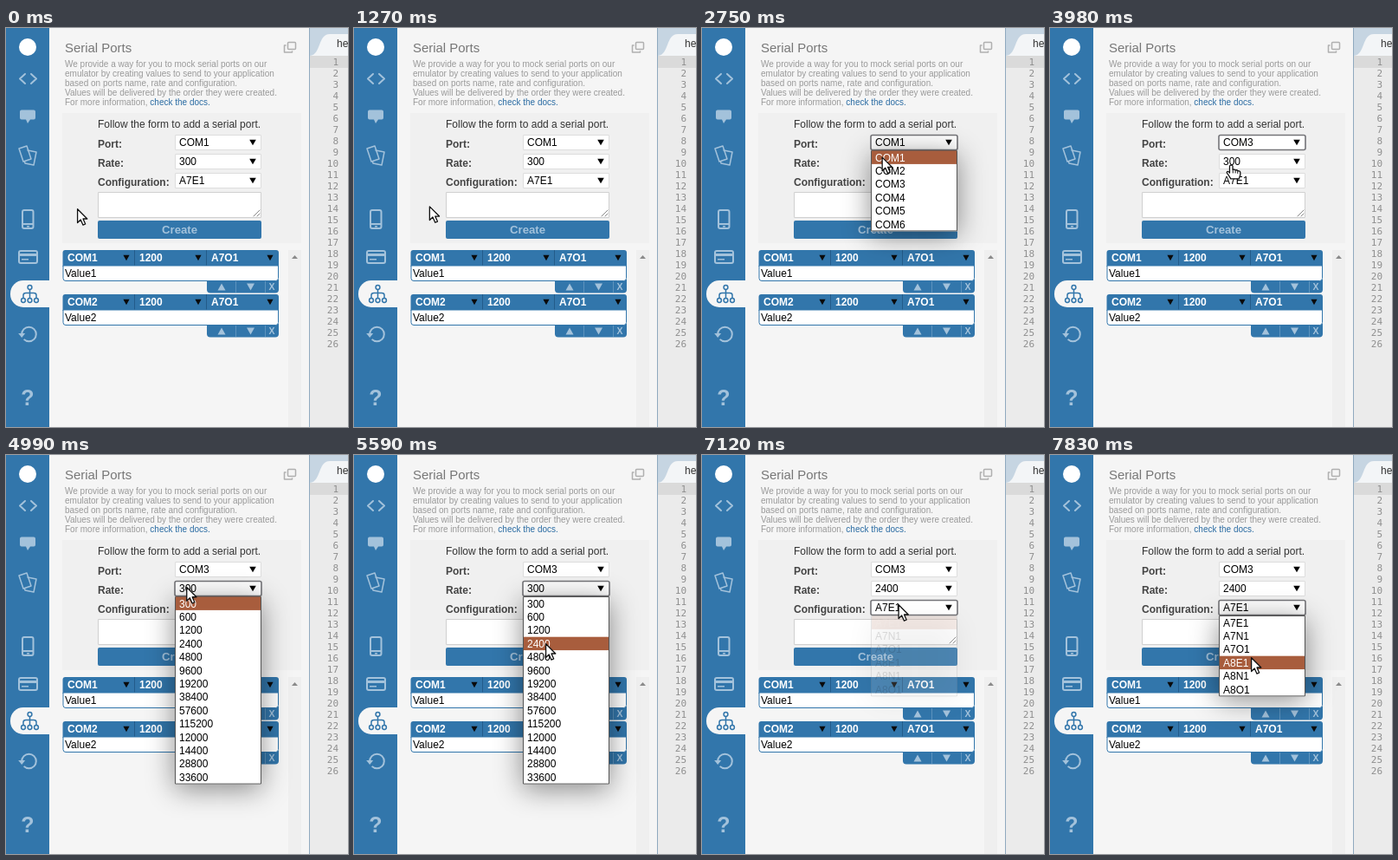
These frames come from a looping animation (395x460 px, 8 s). An HTML page with a canvas:

```html
<!DOCTYPE html>
<html lang="en">
<head>
<meta charset="utf-8">
<title>Serial Ports</title>
<style>
html, body { margin: 0; width: 100%; height: 100%; overflow: hidden; background: #f5f5f5; }
canvas { display: block; }
</style>
</head>
<body>
<canvas id="stage" width="395" height="460"></canvas>
<script>
const ctx = document.getElementById('stage').getContext('2d');
const LOOP = 8000, STEP = 40, ROW = 15.4;
const BLUE = '#3276ab', PALE = '#a3c2db', PAGE = '#f5f5f5';
const SANS = '"Liberation Sans", Arial, sans-serif';

const selects = [
  { label: 'Port:', y: 123, options: ['COM1', 'COM2', 'COM3', 'COM4', 'COM5', 'COM6'] },
  { label: 'Rate:', y: 145, options: ['300', '600', '1200', '2400', '4800', '9600', '19200', '38400',
    '57600', '115200', '12000', '14400', '28800', '33600'] },
  { label: 'Configuration:', y: 167, options: ['A7E1', 'A7N1', 'A7O1', 'A8E1', 'A8N1', 'A8O1'] }
];
// fade: opacity of the opening steps; fadeOut: length of the closing step
const popups = [
  { select: 0, open: 2330, close: 3710, fade: [.2, .7], fadeOut: 40, pick: 2 },
  { select: 1, open: 4630, close: 6160, fade: [.2, .7], fadeOut: 0, pick: 3 },
  { select: 2, open: 7120, close: LOOP, fade: [.13], fadeOut: 0, pick: 0 }
];
const origin = { x: 82, y: 208 };
const moves = [
  { at: 1230, steps: 17, x: 206, y: 131, ease: smooth },
  { at: 2100, steps: 1, x: 206, y: 136, ease: linear },
  { at: 2630, steps: 13, x: 211, y: 176, ease: linear },
  { at: 3900, steps: 7, x: 208, y: 151, ease: easeOut },
  { at: 4990, steps: 16, x: 221, y: 217, ease: smooth },
  { at: 6340, steps: 9, x: 222, y: 180, ease: smooth },
  { at: 6870, steps: 1, x: 226.5, y: 172, ease: linear },
  { at: 7430, steps: 11, x: 232, y: 233, ease: smooth }
];

function linear(p) { return p; }
function smooth(p) { return p * p * (3 - 2 * p); }
function easeOut(p) { return 1 - Math.pow(1 - p, 2.4); }

function pointer(t) {
  let { x, y } = origin;
  for (const m of moves) {
    if (t < m.at) break;
    const p = m.ease(Math.min(1, (Math.floor((t - m.at) / STEP) + 1) / m.steps));
    x += (m.x - x) * p;
    y += (m.y - y) * p;
  }
  return { x, y };
}

function popupAlpha(p, t) {
  if (t < p.open || t >= p.close + p.fadeOut) return 0;
  if (t >= p.close) return .4;
  return p.fade[Math.floor((t - p.open) / STEP)] ?? 1;
}

function rect(x, y, w, h, color) {
  ctx.fillStyle = color;
  ctx.fillRect(x, y, w, h);
}

function round(x, y, w, h, r, fill, stroke, width = 1) {
  ctx.beginPath();
  ctx.roundRect(x, y, w, h, r);
  if (fill) { ctx.fillStyle = fill; ctx.fill(); }
  if (stroke) { ctx.strokeStyle = stroke; ctx.lineWidth = width; ctx.stroke(); }
}

// The text is centred on y by its capital height.
function text(str, x, y, size, color, { weight = '', align = 'left', family = SANS } = {}) {
  ctx.font = `${weight} ${size}px ${family}`;
  ctx.textAlign = align;
  ctx.fillStyle = color;
  ctx.fillText(str, x, y + size * .36);
  return ctx.measureText(str).width;
}

function triangle(x, y, half, height, color) {
  ctx.fillStyle = color;
  ctx.beginPath();
  ctx.moveTo(x - half, y - height / 2);
  ctx.lineTo(x + half, y - height / 2);
  ctx.lineTo(x, y + height / 2);
  ctx.fill();
}

function path(d, { x = 0, y = 0, fill, stroke, width = 1 }) {
  const shape = new Path2D(d);
  ctx.save();
  ctx.translate(x, y);
  ctx.lineJoin = ctx.lineCap = 'round';
  if (fill) { ctx.fillStyle = fill; ctx.fill(shape); }
  if (stroke) { ctx.strokeStyle = stroke; ctx.lineWidth = width; ctx.stroke(shape); }
  ctx.restore();
}

function drawSidebar() {
  rect(0, 0, 50, 460, BLUE);
  ctx.fillStyle = '#fff';
  ctx.beginPath();
  ctx.arc(25, 22, 10, 0, 7);
  ctx.fill();

  const line = { stroke: PALE, width: 2 };
  path('M22 53L16 58.5L22 64M29 53L35 58.5L29 64', line);
  path('M18 94.500H32Q34 94.500 34 96.500V103.500Q34 105.500 32 105.500H28L25 110L23 105.500H18Q16 105.500 16 103.500V96.500Q16 94.500 18 94.500Z', { fill: PALE });
  path('M15 139L24 136L29 151L20 154Z', { stroke: PALE, width: 1.5 });
  path('M25 141L35 143L32 158L22 156L21.500 154', { stroke: PALE, width: 1.5 });

  round(19, 210, 12.5, 21, 2, null, PALE, 2);
  rect(20, 225, 11, 2, PALE);
  rect(24, 228, 3, 1.5, PALE);
  round(15, 257, 21, 14, 2, null, PALE, 2);
  rect(15, 260, 21, 3, PALE);
  rect(18, 266, 8, 1.5, PALE);

  round(5, 291, 46, 31, [15, 0, 0, 15], PAGE);
  path('M27.500 301V312M20 312V308Q20 305.500 23 305.500H32Q35 305.500 35 308V312', { stroke: BLUE, width: 1.5 });
  for (const [x, y] of [[27.5, 299], [20, 314], [27.5, 314], [35, 314]]) {
    ctx.beginPath();
    ctx.arc(x, y, 2.4, 0, 7);
    ctx.fillStyle = PAGE;
    ctx.fill();
    ctx.strokeStyle = BLUE;
    ctx.lineWidth = 1.5;
    ctx.stroke();
  }

  ctx.strokeStyle = PALE;
  ctx.lineWidth = 2;
  ctx.beginPath();
  ctx.arc(26.5, 353, 8.3, Math.PI, Math.PI * 2.75);
  ctx.stroke();
  triangle(18.2, 354.5, 4, 5, PALE);
  text('?', 25, 426, 25, PALE, { weight: 'bold', align: 'center' });
}

function drawEditor() {
  rect(350, 0, 45, 460, '#ebebeb');
  rect(350, 0, 45, 32, '#c6d5e2');
  path('M351 32C364 31 360 7 374 7H396V32Z', { fill: '#f3f5f7' });
  text('he', 382, 18, 12, '#333');
  rect(351, 32, 44, 14, '#dadada');
  for (let n = 1; n <= 26; n++) {
    text(String(n), 384, 26.5 + n * 13, 11, '#8f8f8f', { align: 'right', family: '"DejaVu Sans Mono", monospace' });
  }
  rect(350, 0, 1, 460, '#8fa9bf');
}

function drawIntro() {
  text('Serial Ports', 68, 23, 16.6 * .9, '#777');
  round(325.5, 16.5, 9, 8, 1, null, '#b0b0b0', 1.5);
  path('M323 20H321.500V28H330.500V27', { stroke: '#b0b0b0', width: 1.5 });
  const lines = [
    'We provide a way for you to mock serial ports on our',
    'emulator by creating values to send to your application',
    'based on ports name, rate and configuration.',
    'Values will be delivered by the order they were created.',
    'For more information, '
  ];
  let width;
  lines.forEach((s, i) => { width = text(s, 68, 41.5 + i * 11, 10, '#999'); });
  text('check the docs.', 68 + width, 85.5, 10, '#2b6ca3');
}

function drawForm(values, focus) {
  rect(65, 98, 276, 150, '#f0f0f0');
  text('Follow the form to add a serial port.', 106, 111, 12, '#333');
  selects.forEach((s, i) => {
    text(s.label, 106, s.y + 11, 12, '#444', { weight: 'bold' });
    rect(195, s.y, 100, 18, '#fff');
    if (i === focus) round(195, s.y + .5, 100, 17, 2, null, '#747478', 1.6);
    else round(195.5, s.y + .5, 99, 17, 0, null, '#ddd');
    text(values[i], 200, s.y + 9, 12, '#000');
    triangle(285, s.y + 9, 3.8, 6.5, '#000');
  });
  round(106.5, 189.5, 188, 29, 0, '#fff', '#d0d0d0');
  path('M286 217L293 210M290 217L293 214', { stroke: '#888' });
  round(106, 222, 189, 21, 2, BLUE);
  text('Create', 200.5, 232.5, 13.2, PALE, { weight: 'bold', align: 'center' });
}

function drawEntry(y, port, value) {
  round(65.5, y, 249.5, 19, [3, 3, 0, 0], BLUE);
  [port, '1200', 'A7O1'].forEach((s, i) => {
    const x = 66 + i * 83;
    if (i) rect(x - 1, y, 1, 18, '#235b8a');
    text(s, x + 5, y + 9, 12, '#fff', { weight: 'bold' });
    triangle(x + 73, y + 9, 3.6, 6.5, '#0a0a0a');
  });
  round(232, y + 34, 83, 15.5, [0, 0, 4, 4], BLUE);
  round(66, y + 18, 248.5, 17.5, [0, 0, 3, 3], '#fff', BLUE);
  text(value, 68, y + 27, 12, '#000');
  triangle(249, y + 42.5, 4.5, -8, PALE);
  triangle(282.5, y + 42.5, 4.5, 8, PALE);
  rect(265, y + 36, 1, 13, '#5d93be');
  rect(299, y + 36, 1, 13, '#5d93be');
  text('X', 307, y + 42.5, 10.5, PALE, { weight: 'bold', align: 'center' });
}

function drawPopup(popup, alpha, y) {
  const { options, y: selectY } = selects[popup.select];
  const top = selectY + 18, height = options.length * ROW + 1;
  const active = Math.max(0, Math.min(options.length - 1, Math.floor((y - top - .5) / ROW)));
  ctx.save();
  ctx.globalAlpha = alpha;
  ctx.shadowColor = 'rgba(0,0,0,.45)';
  ctx.shadowBlur = 30;
  ctx.shadowOffsetY = 5;
  rect(195, top, 100, height, '#fff');
  ctx.shadowColor = 'transparent';
  round(195.5, top + .5, 99, height - 1, 0, null, '#555');
  options.forEach((s, i) => {
    const rowY = top + .5 + i * ROW;
    if (i === active) rect(196, rowY, 98, ROW, '#a85d3d');
    text(s, 200, rowY + ROW / 2, 12, i === active ? '#fff' : '#000');
  });
  ctx.restore();
}

function drawPointer({ x, y }, hand) {
  const style = { x, y, fill: '#fff', stroke: '#111', width: 1.3 };
  if (hand) {
    path('M0 .7Q2 .2 2.300 2V6Q4.500 5 5.200 6.500Q7.200 5.700 8 7.300Q10.800 6.800 11 9V12L9.500 16.300H0L-3 11.500Q-5.500 9 -4 8Q-2.800 7.500 -1.300 9.500V2Q-1.300 1 0 .7Z', style);
    path('M2.500 7V9.500M5.300 7.500V9.500M8 8V10', { x, y, stroke: '#111' });
  } else {
    path('M.6 .8V16.500L4.200 13L7 19.200L9.700 18L7 12H11.800Z', style);
  }
}

function draw(t) {
  const at = pointer(t);
  const values = selects.map(s => s.options[0]);
  let focus = -1, current = null, alpha = 0;
  for (const p of popups) {
    if (t >= p.open) focus = p.select;
    if (t >= p.close) values[p.select] = selects[p.select].options[p.pick];
    const a = popupAlpha(p, t);
    if (a) { current = p; alpha = a; }
  }
  const overSelect = at.x >= 195 && at.x < 295 && selects.some(s => at.y >= s.y && at.y < s.y + 18);

  rect(0, 0, 395, 460, PAGE);
  drawIntro();
  drawForm(values, focus);
  rect(326, 256, 15, 204, '#efefef');
  triangle(333.5, 264, 3.5, -4, '#8a8a8a');
  drawEntry(256, 'COM1', 'Value1');
  drawEntry(307, 'COM2', 'Value2');
  drawSidebar();
  drawEditor();
  if (current) drawPopup(current, alpha, at.y);
  drawPointer(at, overSelect && !current);
}

const began = performance.now();
function tick() {
  draw((performance.now() - began) % LOOP);
  requestAnimationFrame(tick);
}
tick();
</script>
</body>
</html>
```
